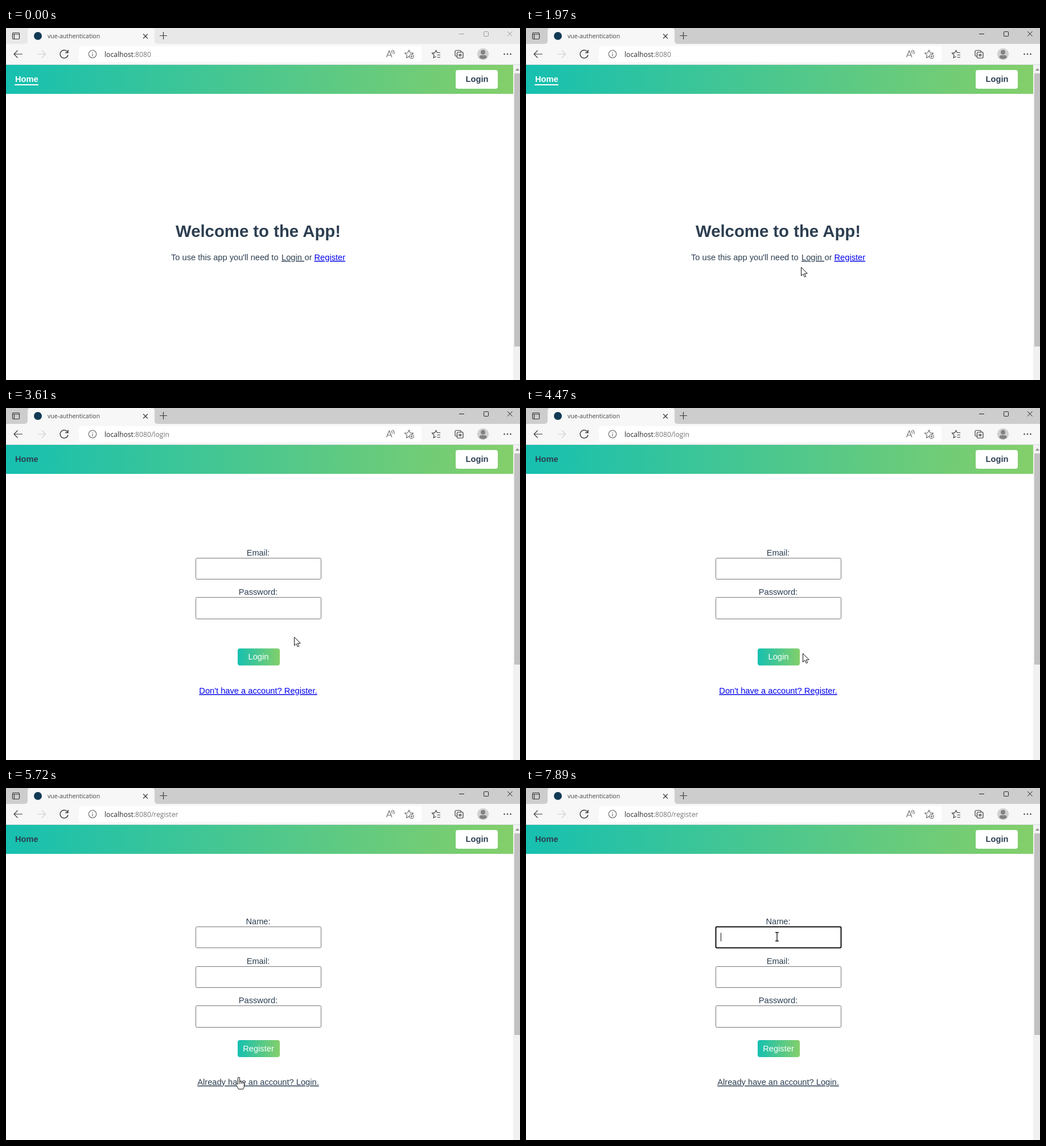
An HTML page that plays this animation: 903x620 px, repeating every 8 s.

```html
<!DOCTYPE html>
<html lang="en">
<head>
<meta charset="utf-8">
<title>vue-authentication</title>
<style>
  html, body { margin: 0; width: 100%; height: 100%; overflow: hidden; background: #fff; }
  svg { display: block; }
  text { font: 14.67px "Liberation Sans", Arial, sans-serif; fill: #2c3e50; }
  .bold { font-weight: bold; }
  .mid { text-anchor: middle; }
  .ui { font: 12.15px "Open Sans", sans-serif; fill: #767676; }
  .link { text-decoration: underline; }
  .blue { fill: #00e; }
  .icon { fill: none; stroke: #3b3b3b; stroke-width: 1.2; }
  .field { fill: #fff; stroke: #767676; }
  .field.hover { stroke: #4a4a4a; }
  .field.focus { stroke: #101010; stroke-width: 2; }
  .pointer { fill: #fff; stroke: #111; stroke-width: 1; stroke-linejoin: round; }
</style>
</head>
<body>
<svg width="903" height="620" viewBox="0 0 903 620">
  <defs>
    <linearGradient id="brand"><stop stop-color="#16c0b0"/><stop offset="1" stop-color="#84cf6a"/></linearGradient>
  </defs>

  <!-- browser window -->
  <rect id="titleBar" width="903" height="28"/>
  <path d="M32 28Q38 28 38 22V5Q38 0 43 0H256Q261 0 261 5V22Q261 28 267 28Z" fill="#f7f7f7"/>
  <rect y="28" width="903" height="36" fill="#f7f7f7"/>
  <rect y="64" width="903" height="1" fill="#d9dcdc"/>
  <circle cx="56" cy="14" r="7" fill="#123a55"/>
  <text class="ui" x="73" y="18" style="font-size:10.5px;fill:#444">vue-authentication</text>
  <path class="icon" d="M11.5 10Q11.5 8.500 13 8.500H22Q23.500 8.500 23.500 10V18Q23.500 19.500 22 19.500H13Q11.500 19.500 11.500 18ZM11.500 11H23.500M14.500 11V19M241 10.500L249 18.500M249 10.500L241 18.500M270 13.500H283M276.500 7V20"/>
  <path id="controls" class="icon" style="stroke-width:1" d="M796 10.500H805M840.500 6.500H846.500Q847.500 6.500 847.500 7.500V13.500Q847.500 14.500 846.500 14.500H840.500Q839.500 14.500 839.500 13.500V7.500Q839.500 6.500 840.500 6.500ZM881 6L889.500 14.500M889.500 6L881 14.500"/>
  <path class="icon" d="M29 46H14.500M20.500 39.500L14 46L20.500 52.500"/>
  <path class="icon" style="stroke:#d0d0d0" d="M55 46H69M63 39.500L69.500 46L63 52.500"/>
  <path class="icon" style="stroke-width:1.400" d="M108.500 43A7 7 0 1 0 109 47.500M109 38.500V43.500H104"/>
  <rect x="128" y="32" width="602" height="28" rx="3" fill="#fff"/>
  <g class="icon" style="stroke:#666;stroke-width:1.100">
    <circle cx="152" cy="46" r="6.700"/>
    <path d="M152 45V50M152 42V43.500M668.500 51.500L673.300 40L678 51.500M670.300 48H676.500M676.500 40Q679 42 678 45M679 38.500Q683 41.500 681.500 46"/>
    <path id="star" d="M708 39L710.200 43.700L715.500 44.200L711.600 47.700L712.500 52.500L708 50.200L703.500 52.500L704.400 47.700L700.500 44.200L705.800 43.700Z"/>
    <circle cx="712.500" cy="50" r="3.800" fill="#fff"/>
    <path d="M710.500 50H714.500M712.500 48V52"/>
  </g>
  <path class="icon" d="M757.500 43.500L755.500 39.500L753.300 43.700L748.500 44.300L752 47.600L751.200 52.500L755.500 50.200M757.500 43.500H763M757.500 47.500H763M757.500 51.500H763M792 49.500H790.500Q789 49.500 789 48V41.500Q789 39.500 791 39.500H797.500Q799.500 39.500 799.500 42.500M794.500 42.500H801.500Q803 42.500 803 44V51.500Q803 53 801.500 53H794Q792.500 53 792.500 51.500V44Q792.500 42.500 794.500 42.500ZM794.800 47.700H800.800M797.800 44.700V50.700"/>
  <circle cx="838" cy="46" r="10.200" fill="#cfcfcf"/>
  <circle cx="838" cy="42.700" r="4" fill="#828282"/>
  <path d="M831.500 52.500Q831.500 48 835 48H841Q844.500 48 844.500 52.500Q838 57 831.500 52.500Z" fill="#828282"/>
  <path d="M875.500 46h0M881 46h0M886.500 46h0" stroke="#333" stroke-width="2.400" stroke-linecap="round"/>
  <text class="ui" x="173" y="50.500"><tspan fill="#2b2b2b">localhost</tspan>:8080<tspan id="route"></tspan></text>

  <!-- navigation and scrollbar -->
  <rect y="65" width="891" height="51" fill="url(#brand)"/>
  <text id="home" class="bold" x="16" y="95">Home</text>
  <rect id="homeLine" x="15" y="99" width="42" height="2" fill="#fff"/>
  <rect x="790" y="74" width="74" height="33" rx="4" fill="#fff"/>
  <text class="bold mid" x="827.500" y="95">Login</text>
  <rect x="891" y="65" width="12" height="555" fill="#f1f1f1"/>
  <rect id="thumb" x="893" y="80" width="10" fill="#c1c1c1"/>
  <path d="M895 75L898.500 71L902 75Z" fill="#8a8a8a"/>

  <g class="page">
    <text class="bold mid" x="443" y="368" style="font-size:29.330px">Welcome to the App!</text>
    <text x="290" y="409">To use this app you'll need to</text>
    <text class="link" x="484" y="409">Login&nbsp;</text>
    <text x="524.500" y="409">or</text>
    <text class="link blue" x="541.500" y="409">Register</text>
  </g>
  <g class="page"></g>
  <g class="page"></g>

  <rect id="caret" x="342" y="255" width="1" height="15" fill="#111"/>
  <path id="status" fill="#f2f2f2" stroke="#cfcfcf"/>
  <g id="cursor">
    <path class="pointer" d="M.5.5V15.500L4 12.200L6.400 17.600L8.700 16.600L6.300 11.300H11.200Z"/>
    <path class="pointer" d="M-1.500 13V2Q-1.500.5 0 .5T1.500 2V8Q3 6.600 4.200 8.600Q5.700 7.300 7 9.400Q9.500 8.600 9.500 11V15Q9.500 19 7.500 21.300H-.5Q-2 18-4.600 14.500Q-5.500 12-3.400 11.700Q-2.300 12-1.500 13ZM1.500 8V12M4.200 8.600V12M7 9.400V12"/>
    <path class="pointer" style="fill:none;stroke-width:1.300" d="M-3-7.500H3M-3 7.500H3M0-7.500V7.500"/>
  </g>
</svg>
<script>
const $ = id => document.getElementById(id);
const show = (el, on) => { el.style.display = on ? '' : 'none'; };
const pages = [...document.querySelectorAll('.page')];

const field = (label, y, h = 37) => `
  <text class="mid" x="443" y="${y - 4}">${label}:</text>
  <rect class="field" x="333.5" y="${y + .5}" width="220" height="${h}" rx="2"/>`;
const submit = (label, y) => `
  <rect x="407" y="${y}" width="74" height="30" rx="4" fill="url(#brand)"/>
  <text class="mid" x="443.5" y="${y + 19.5}" style="fill:#fff">${label}</text>`;

pages[1].innerHTML = field('Email', 264) + field('Password', 333, 38) + submit('Login', 423.5) +
  `<text id="signUp" class="link mid blue" x="443" y="503">Don't have a account? Register.</text>`;
pages[2].innerHTML = field('Name', 244) + field('Email', 314) + field('Password', 383, 38) + submit('Register', 444) +
  `<text class="link mid" x="443" y="523">Already have an account? Login.</text>`;

const routes = ['', '/login', '/register'];
const thumbEnds = [561, 452, 435];
// link boxes per page: left, top, right, bottom
const links = [[484, 395, 525, 413], [338, 489, 548, 507], [335, 509, 551, 527]];
const fields = [...pages[2].querySelectorAll('.field')];
const fieldTops = [244, 314, 383];

// first step, last step, step count, destination of the pointer
const moves = [
  [260, 520, 5, 470, 474], [790, 850, 2, 472, 470], [1050, 1250, 4, 461, 421],
  [1640, 2040, 6, 485, 421], [2300, 2360, 2, 505, 429], [2560, 2820, 5, 510, 404],
  [3220, 3280, 2, 506, 403], [3810, 4010, 4, 493, 425], [4340, 5000, 11, 409, 504],
  [5720, 5720, 1, 409, 509], [5785, 6440, 11, 441, 262]
];

function pointerAt(t) {
  let x = 889, y = 620;
  for (const [from, to, count, toX, toY] of moves) {
    if (t < from) break;
    const step = count > 1 ? Math.floor((t - from) / (to - from) * (count - 1) + .01) + 1 : 1;
    const p = Math.min(1, step / count), e = p * p * (3 - 2 * p);
    x += (toX - x) * e;
    y += (toY - y) * e;
  }
  return [x, y];
}

function draw(t) {
  const page = t < 3550 ? 0 : t < 5460 ? 1 : 2;
  const active = t >= 1640, focused = t >= 6840;
  const [x, y] = pointerAt(t);
  pages.forEach((el, i) => show(el, i === page));

  $('titleBar').style.fill = active ? '#cdcdcd' : '#e8e8e8';
  $('controls').style.stroke = active ? '#222' : '#999';
  $('route').textContent = routes[page];
  $('home').style.fill = page ? '' : '#fff';
  show($('homeLine'), !page);
  $('thumb').setAttribute('height', thumbEnds[page] - 80);
  $('signUp').style.fill = t >= 5190 && t < 5320 ? '#f00' : '';

  const [left, top, right, bottom] = links[page];
  const onLink = x >= left && x < right && y >= top && y < bottom;
  const hovered = page === 2 ? fieldTops.findIndex(f => y >= f && y < f + 38) : -1;
  const kind = onLink || (t >= 3550 && t < 3610) ? 1 : hovered >= 0 ? 2 : 0;
  fields.forEach((el, i) => {
    el.classList.toggle('hover', i === hovered);
    el.classList.toggle('focus', i === 0 && focused);
  });
  show($('caret'), focused && (t < 7430 || t >= 7890));

  const statusWidth = page ? 119 : 105;
  show($('status'), (t >= 3030 && t < 3550) || (t >= 5130 && t < 5460));
  $('status').setAttribute('d', `M-1 616.5H${statusWidth - 3}Q${statusWidth + .5} 616.5 ${statusWidth + .5} 620V622H-1Z`);

  show($('cursor'), t >= 260);
  $('cursor').setAttribute('transform', `translate(${Math.round(x)} ${Math.round(y)})`);
  [...$('cursor').children].forEach((el, i) => show(el, i === kind));
}

function tick() {
  draw(performance.now() % 8000);
  requestAnimationFrame(tick);
}
tick();
</script>
</body>
</html>
```
